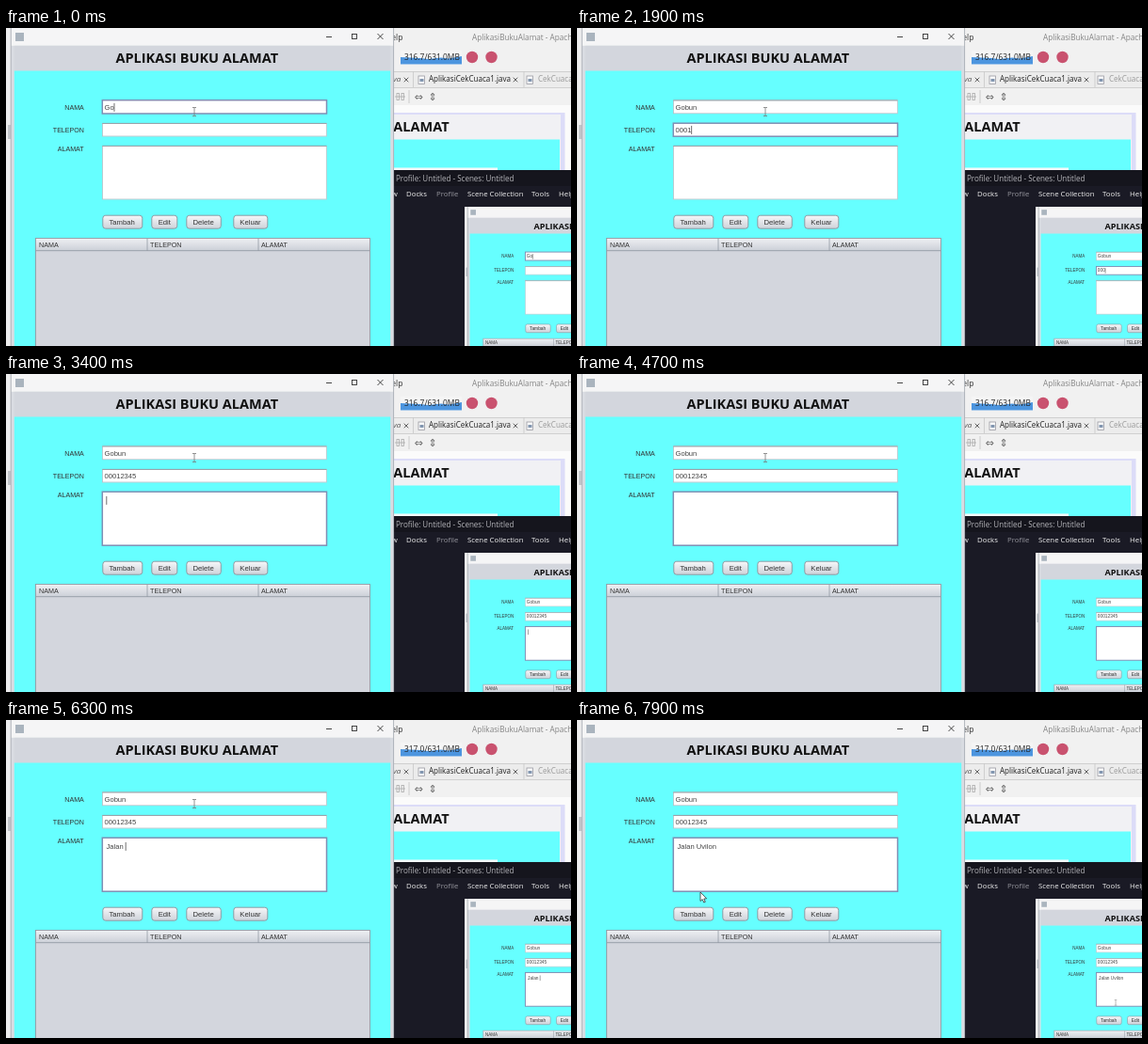
Animation of 600 by 338 pixels, one loop 8000 ms. Source, as an HTML page with a canvas:

```html
<!DOCTYPE html>
<html lang="id">
<head>
<meta charset="utf-8">
<title>Aplikasi Buku Alamat</title>
<style>
html, body { margin: 0; width: 100%; height: 100%; overflow: hidden; }
canvas { display: block; width: 600px; height: 338px; }
</style>
</head>
<body>
<canvas id="stage" width="600" height="338"></canvas>
<script>
const ctx = document.getElementById('stage').getContext('2d');
const LOOP = 8000, STEP = 100, BLINK = 500, MIRROR_DELAY = 70;
const SWING = '"Liberation Sans", Arial, sans-serif';
const UI = '"Open Sans", sans-serif';
const CYAN = '#66ffff', PANEL = '#d3d6dd';

// Each entry: time, focused field, text in that field.
const edits = [
  [0, 0, 'Go'], [100, 0, 'Gob'], [200, 0, 'Gobu'], [320, 0, 'Gobun'],
  [520, 1, ''], [1220, 1, '0'], [1520, 1, '00'], [1800, 1, '000'], [1900, 1, '0001'],
  [2000, 1, '00012'], [2100, 1, '000123'], [2400, 1, '0001234'], [2500, 1, '00012345'],
  [3120, 2, ''], [5300, 2, 'J'], [5400, 2, 'Ja'], [5500, 2, 'Jal'], [5600, 2, 'Jala'],
  [5620, 2, 'Jalan'], [5820, 2, 'Jalan '], [6400, 2, 'Jalan U'], [6500, 2, 'Jalan Uv'],
  [6700, 2, 'Jalan Uvi'], [6800, 2, 'Jalan Uvil'], [6900, 2, 'Jalan Uvilo'], [7020, 2, 'Jalan Uvilon']
];
const pointerPath = [[0, 200, 89], [7600, 193, 106], [7700, 160, 145], [7800, 135, 176], [7900, 131, 183]];

const fields = [
  { label: 'NAMA', x: 102.3, y: 76.7, h: 14.3, labelX: 62.3, labelY: 84.8, textX: 104.5, textY: 84.6 },
  { label: 'TELEPON', x: 102.3, y: 101.2, h: 14, labelX: 49.8, labelY: 108.8, textX: 104.5, textY: 108.6 },
  { label: 'ALAMAT', x: 102.3, y: 125.2, h: 57, labelX: 54.8, labelY: 129.3, textX: 106.5, textY: 134.6 }
];

function rect(x, y, w, h, color) {
  ctx.fillStyle = color;
  ctx.fillRect(x, y, w, h);
}

function frame(x, y, w, h, color, width = 1) {
  ctx.strokeStyle = color;
  ctx.lineWidth = width;
  ctx.strokeRect(x, y, w, h);
}

function line(color, width, ...points) {
  ctx.strokeStyle = color;
  ctx.lineWidth = width;
  ctx.beginPath();
  points.forEach(([x, y]) => ctx.lineTo(x, y));
  ctx.stroke();
}

function disc(x, y, r, color) {
  ctx.fillStyle = color;
  ctx.beginPath();
  ctx.arc(x, y, r, 0, 2 * Math.PI);
  ctx.fill();
}

function text(string, x, y, size, color = '#333', family = SWING, style = '') {
  ctx.font = `${style} ${size}px ${family}`;
  ctx.textBaseline = 'middle';
  ctx.fillStyle = color;
  ctx.fillText(string, x, y);
}

function cross(x, y, r, color) {
  line(color, 0.9, [x - r, y - r], [x + r, y + r]);
  line(color, 0.9, [x - r, y + r], [x + r, y - r]);
}

function fade(y, h, top, bottom) {
  const gradient = ctx.createLinearGradient(0, y, 0, y + h);
  gradient.addColorStop(0, top);
  gradient.addColorStop(1, bottom);
  return gradient;
}

function stateAt(time) {
  const t = Math.max(0, time);
  const values = ['', '', ''];
  let focus, since;
  for (const [at, field, value] of edits) {
    if (at > t) break;
    values[field] = value;
    focus = field;
    since = at;
  }
  const caret = Math.floor((t - since) / BLINK) % 2 === 0;
  const pointer = pointerPath.filter(p => p[0] <= t).pop();
  return { values, focus, caret, pointer };
}

function drawField({ x, y, h, textX, textY }, value, focused, caret) {
  rect(x, y, 238.2, h, '#fff');
  if (focused) {
    frame(x, y, 238.2, h, '#7f8fb4', 1.5);
  } else {
    frame(x + 0.2, y + 0.2, 237.8, h - 0.4, '#b4bfc6', 0.8);
    line('#8b949b', 0.8, [x, y + 0.2], [x + 238.2, y + 0.2]);
  }
  text(value, textX, textY, 7.6, '#444');
  if (focused && caret) {
    rect(textX + ctx.measureText(value).width, textY - 4.7, 0.7, 9, '#333');
  }
}

function drawButton(label, x, w, textX) {
  ctx.beginPath();
  ctx.roundRect(x, 199.2, w, 14, 3);
  ctx.fillStyle = fade(199, 14, '#f6f7f9', '#cfd3da');
  ctx.fill();
  ctx.strokeStyle = '#89929b';
  ctx.lineWidth = 0.9;
  ctx.stroke();
  text(label, textX, 206.7, 7.7);
}

function drawTable() {
  rect(31.5, 223.5, 355, 130, PANEL);
  rect(31.5, 223.5, 355, 13, fade(223, 14, '#f0f1f4', '#cbcfd7'));
  frame(31.5, 223.5, 355, 130, '#929ba4', 0.9);
  line('#929ba4', 0.9, [31.5, 236.7], [386.5, 236.7]);
  for (const x of [150, 268]) line('#929ba4', 0.8, [x, 224], [x, 237]);
  text('NAMA', 35, 230.6, 7.2);
  text('TELEPON', 153, 230.6, 7.2);
  text('ALAMAT', 271, 230.6, 7.1);
}

function drawPointer([, x, y], arrow) {
  if (!arrow) {
    line('#777', 0.8, [x, y - 4], [x, y + 4]);
    for (const side of [-4.5, 4.5]) line('#777', 0.8, [x - 2, y + side], [x + 2, y + side]);
    return;
  }
  ctx.save();
  ctx.translate(x, y);
  ctx.fillStyle = '#fff';
  ctx.strokeStyle = '#333';
  ctx.lineWidth = 0.8;
  ctx.beginPath();
  [[0, 0], [0, 9.5], [2.2, 7.6], [3.8, 11], [5.3, 10.3], [3.8, 7], [6.6, 6.8]].forEach(p => ctx.lineTo(...p));
  ctx.closePath();
  ctx.fill();
  ctx.stroke();
  ctx.restore();
}

function drawAddressBook(state) {
  // A sliver of the desktop shows to the left of the window.
  rect(0, 0, 5, 340, '#eeeeef');
  rect(2, 103, 3, 15, '#c3c6ca');

  rect(5, 0, 407, 340, '#d9dce2');
  rect(5.5, 0, 406, 18.8, '#f5f5f6');
  rect(10, 5, 9, 9, '#aab4be');
  line('#333', 0.9, [340, 9.5], [346, 9.5]);
  frame(367.5, 6.5, 5, 5, '#333', 0.9);
  cross(397.5, 9, 3, '#333');
  rect(8.8, 18.8, 399.4, 27, PANEL);
  rect(8.8, 45.5, 399.4, 294.5, CYAN);
  line('#a3a8ae', 0.8, [5.2, 0], [5.2, 340]);
  line('#a3a8ae', 0.8, [411.6, 0], [411.6, 340]);
  text('APLIKASI BUKU ALAMAT', 116.5, 33.7, 14.5, '#111', UI, 'bold');

  fields.forEach((field, i) => {
    text(field.label, field.labelX, field.labelY, 7.1);
    drawField(field, state.values[i], i === state.focus, state.caret);
  });
  drawButton('Tambah', 102.8, 42, 109.5);
  drawButton('Edit', 154.8, 27, 161.7);
  drawButton('Delete', 191.8, 36.5, 198.5);
  drawButton('Keluar', 241.8, 36, 248.3);
  drawTable();
  drawPointer(state.pointer, state.pointer[0] >= 7900);
}

function drawIde(memory) {
  rect(0, 0, 600, 338, '#f1f1f1');
  text('Help', 403, 10.6, 8.5, '#333', UI);
  text('AplikasiBukuAlamat - Apache', 495, 10.6, 8.2, '#858585', UI);

  rect(419, 24, 65, 15, '#f5f5f5');
  ctx.fillStyle = '#4c95df';
  ctx.beginPath();
  [[419, 31], [440, 32], [448, 33], [462, 31.5], [470, 32.5], [484, 30], [484, 38.5], [419, 38.5]]
    .forEach(p => ctx.lineTo(...p));
  ctx.fill();
  text(memory + '/631.0MB', 423, 31.6, 8.4, '#222', UI);
  disc(495, 31, 6.2, '#c9526f');
  disc(515.5, 31, 6.2, '#c9526f');

  rect(411, 46, 189, 17, '#ececec');
  line('#c8c8c8', 0.8, [411, 46.5], [600, 46.5]);
  line('#c8c8c8', 0.8, [411, 63.5], [600, 63.5]);
  for (const x of [432.5, 550]) line('#c8c8c8', 0.8, [x, 46], [x, 63]);
  text('va', 411, 54.9, 8, '#555', UI, 'italic');
  cross(425, 55, 2.3, '#555');
  for (const x of [438, 553]) {
    rect(x, 51, 6.5, 8.5, '#fafafa');
    frame(x, 51, 6.5, 8.5, '#9a9aa2', 0.8);
    rect(x + 1.5, 54, 4, 3, '#8296b0');
  }
  text('AplikasiCekCuaca1.java', 449, 54.9, 8.05, '#222', UI);
  cross(541, 55, 2.3, '#555');
  text('CekCuaca1.java', 565, 54.9, 8.05, '#9a9a9a', UI);

  for (const x of [415, 420]) frame(x, 69.5, 2.5, 7, '#aaa', 0.8);
  line('#aaa', 0.8, [413, 73], [424, 73]);
  line('#c4c4c4', 0.8, [428, 66], [428, 80]);
  text('⇔', 433.5, 73.8, 11, '#666', '"DejaVu Sans", sans-serif');
  text('⇕', 448.5, 73.8, 11, '#666', '"DejaVu Sans", sans-serif');

  rect(411, 82, 189, 70, '#fbfbfb');
  rect(400, 90, 193.5, 62, '#dcdcf8');
  rect(400, 92, 189, 60, '#f1f1f4');
  rect(400, 118.5, 188, 33, CYAN);
  rect(400, 148.5, 122, 3, '#f4fafa');
  text('APLIKASI BUKU ALAMAT', 298, 106.5, 14.5, '#111', UI, 'bold');
}

function drawRecorder() {
  rect(408, 151, 192, 187, '#1a1a25');
  rect(408, 151, 192, 17, '#15151d');
  text('Profile: Untitled - Scenes: Untitled', 414, 160.8, 8.05, '#b5b5ba', UI);
  const menu = [['View', 399], ['Docks', 425], ['Profile', 457, '#96969e'], ['Scene Collection', 490], ['Tools', 558], ['Help', 587]];
  for (const [label, x, color = '#f0f0f0'] of menu) text(label, x, 177.3, 7.8, color, UI);
}

function draw(now) {
  const t = Math.floor((now % LOOP) / STEP) * STEP;
  drawIde(t < 4900 ? '316.7' : '317.0');
  drawRecorder();

  // The recorder preview repeats the window at a smaller size, slightly late.
  ctx.save();
  ctx.translate(487, 190);
  ctx.scale(0.63, 0.627);
  drawAddressBook(stateAt(t - MIRROR_DELAY));
  ctx.restore();

  drawAddressBook(stateAt(t));
}

let start;
function tick(now) {
  start ??= now;
  draw(now - start);
  requestAnimationFrame(tick);
}
draw(0);
requestAnimationFrame(tick);
</script>
</body>
</html>
```
